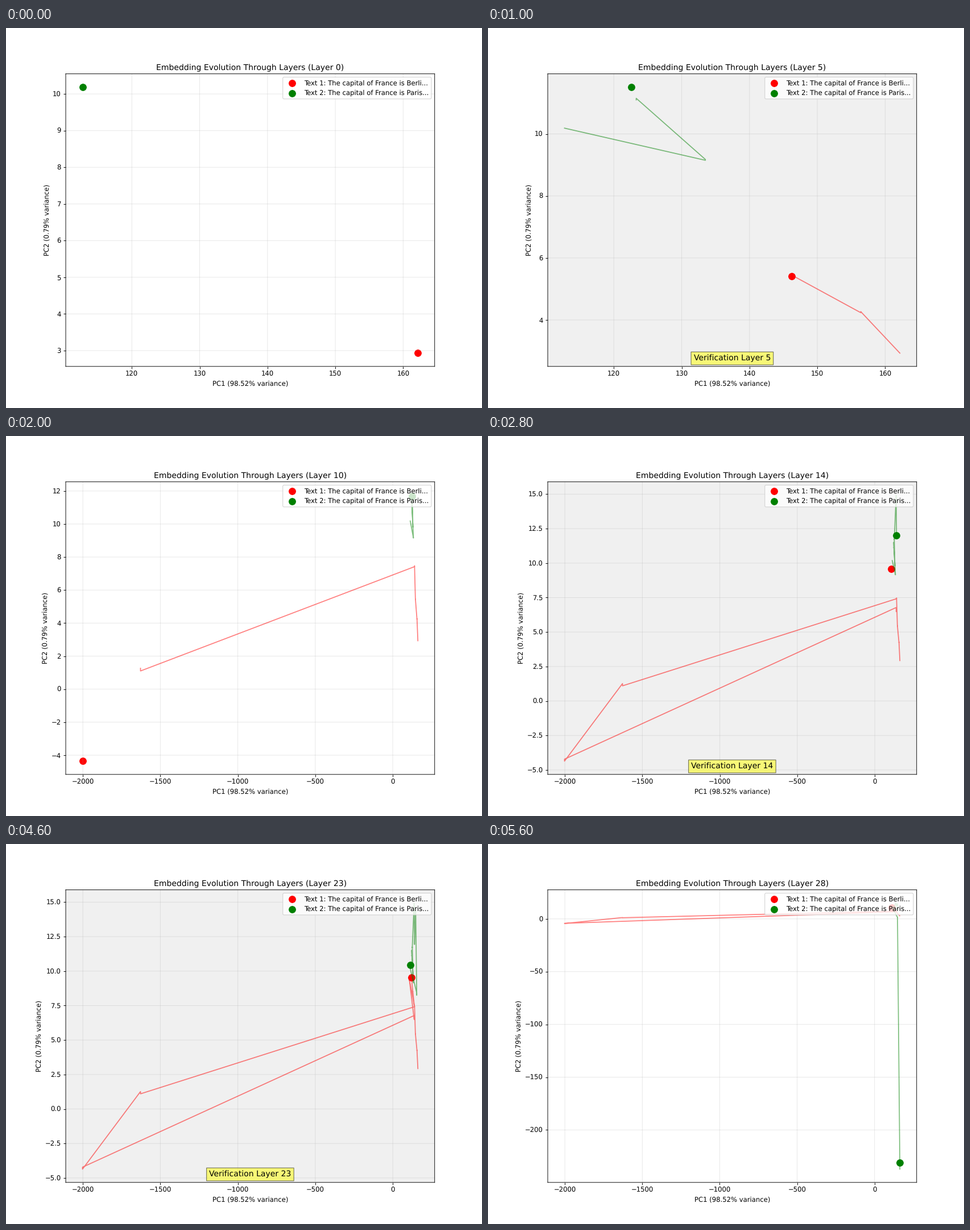
Animation, 837 px wide and 669 px high, one loop 5800 ms. Source, as a matplotlib script:

```python
import numpy as np
import matplotlib.pyplot as plt
from matplotlib.animation import FuncAnimation

W, H, DPI = 837, 669, 83.7
LAYERS = 29
REBOUND = 0.026

# Unhinted, unsnapped drawing keeps the soft look of a scaled-down plot
plt.rcParams.update({"text.hinting": "none", "path.snap": False})


def walk(keys, shift):
    """Hop to a new position every two layers, falling back a little in between."""
    hops = np.arange(max(keys) + 1)
    pc1, pc2 = (np.interp(hops, list(keys), axis) for axis in zip(*keys.values()))
    hop, settling = np.divmod(np.arange(LAYERS) + shift, 2)
    fall = REBOUND * np.diff(pc2, prepend=pc2[0])
    return np.column_stack((pc1[hop], pc2[hop] - settling * fall[hop]))


# hop: (PC1, PC2), straight moves between the keys
red = walk({
    0: (162.17, 2.93), 1: (156.4, 4.27), 2: (146.2, 5.45), 3: (140.6, 7.47),
    4: (-1628, 1.1), 5: (-2002.3, -4.36), 6: (138.3, 6.78), 7: (105, 9.58),
    9: (138.7, 7.5), 11: (120.4, 9.56), 14: (113, 10.5),
}, shift=0)
green = walk({
    0: (112.73, 10.187), 1: (133.5, 9.15), 2: (123.3, 11.15), 3: (122.6, 11.51),
    4: (130, 9.8), 5: (126, 11.75), 6: (138, 14.93), 7: (140.6, 11.93),
    9: (148, 14.4), 10: (154.8, 8.25), 12: (115, 10.45), 13: (148, 1.4),
    14: (163.5, -237.1),
}, shift=1)

SERIES = (
    (red, "red", "Text 1: The capital of France is Berli..."),
    (green, "green", "Text 2: The capital of France is Paris..."),
)

fig, ax = plt.subplots(figsize=((W + 0.01) / DPI, (H + 0.01) / DPI), dpi=DPI)
fig.subplots_adjust(left=0.1255, right=0.9005, bottom=0.1094, top=0.8794)


def update(layer):
    ax.clear()
    for path, color, label in SERIES:
        ax.plot(*path[:layer].T, color=color, alpha=0.5)
        ax.scatter(*path[layer], color=color, s=100, label=label)

    ax.set_title(f"Embedding Evolution Through Layers (Layer {layer})")
    ax.set_xlabel("PC1 (98.52% variance)")
    ax.set_ylabel("PC2 (0.79% variance)")
    ax.grid(True, alpha=0.3)
    ax.legend(loc="upper right")

    verified = layer % 9 == 5
    ax.set_facecolor("#f0f0f0" if verified else "white")
    if verified:
        ax.text(0.5, 0.02, f"Verification Layer {layer}", transform=ax.transAxes,
                ha="center", fontsize=12, bbox=dict(facecolor="yellow", alpha=0.5))


anim = FuncAnimation(fig, update, frames=LAYERS, interval=200, repeat=True)
plt.show()
```
